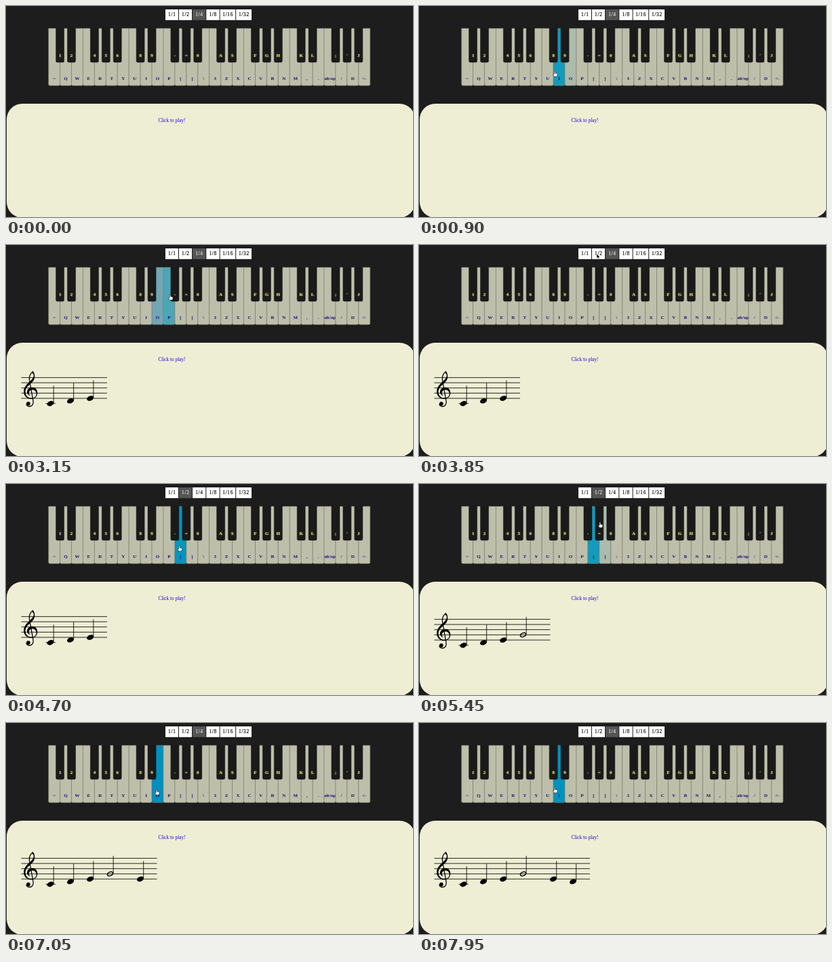
These frames come from a looping animation (600 by 311 pixels, 8000 ms). An HTML page:

```html
<!DOCTYPE html>
<html lang="en">
<head>
<meta charset="utf-8">
<title>Piano notes</title>
<style>
  html, body { margin: 0; width: 100%; height: 100%; overflow: hidden; background: #1d1d1d; }
  svg { display: block; width: 600px; height: 311px; }
  text { font-family: "Liberation Serif", serif; text-anchor: middle; white-space: pre; }
  .key { stroke: #7f8072; stroke-width: .6; }
  .label { font-weight: bold; font-size: 7px; fill: #1c1078; }
  .sharp { fill: #1a1a1a; stroke: #101010; stroke-width: .5; }
  .sharp-label { font-weight: bold; font-size: 7px; fill: #dede82; text-shadow: 0 0 2px #a0a020; }
  .length { font-size: 7.4px; letter-spacing: .7px; stroke-width: .15; }
  .play { font-size: 7.3px; fill: #1c00d2; }
  .line { stroke: #000; stroke-width: .85; fill: none; }
</style>
</head>
<body>
<svg viewBox="0 0 600 311" id="stage">
  <rect x="1" y="144" width="602" height="168" rx="23" fill="#eeeed5"/>
  <g id="buttons"></g>
  <g id="keys"></g>
  <text class="play" x="244.5" y="171">Click to play!</text>
  <g id="score">
    <path id="staff" class="line"/>
    <g transform="translate(0 -226)">
      <path d="M39 185.2C41.5 187.5 42.8 191 42.2 195.5C41.6 200 38.2 203 34.5 206C31 209 28.6 212 28.6 216.5C28.6 222 32.5 225.6 37.5 225.6C42 225.6 44.7 223 44.7 219.5C44.7 216 42.5 213.6 39.2 213.6C36 213.6 33.8 215.6 33.8 218C33.8 220 35 221.6 36.8 222.4C33.5 222 31 219.8 31 216.8C31 212.8 34.5 209.8 39 209.8C43.5 209.8 46.3 213.5 46.3 218C46.3 223.5 42.5 226.9 37 226.9C30.5 226.9 26.2 222.3 26.2 216C26.2 210 30 206 33.6 202.6C37 199.5 40.6 196.3 40.8 192.5C40.9 190.5 40 189.3 38.9 189.3Z"/>
      <path d="M38.9 187C35.5 190 33.8 194.5 34.6 199.5L40 229.5C41 234.5 38.5 238 34.5 238C31.5 238 30 236 30 234.2" fill="none" stroke="#000" stroke-width="1.3"/>
      <circle cx="32.9" cy="233.9" r="2.8"/>
    </g>
    <g id="notes"></g>
  </g>
  <g id="cursor" stroke-linejoin="round">
    <path id="hand" d="M-.8 .4Q0-.6 .8 .4V3L3.4 3.6Q4.3 4 4 5.6L3.2 8H-.6L-2.6 5.2Q-2.6 4-.8 5Z" fill="#fff" stroke="#222" stroke-width=".6"/>
    <path id="arrow" d="M0 0V6.8L1.6 5.4L2.7 8L3.9 7.5L2.8 5H4.9Z" fill="#000" stroke="#fff" stroke-width=".6"/>
  </g>
</svg>
<script>
const LOOP = 8000, FADE = 200, FADE_STEPS = 20;
const KEY_LEFT = 62.7, KEY_WIDTH = 16.93, KEY_TOP = 33, KEY_BOTTOM = 117;
const IDLE = [190, 191, 170], HOVER = [0, 150, 190], PRESSED = [0, 128, 192];
const GAP = 7.65;
const $ = id => document.getElementById(id);

function add(parent, tag, attrs, text = '') {
  const node = document.createElementNS('http://www.w3.org/2000/svg', tag);
  for (const name in attrs) node.setAttribute(name, attrs[name]);
  node.textContent = text;
  return parent.appendChild(node);
}

// Note length buttons
const buttons = [['1/1', 235, 19], ['1/2', 255, 19], ['1/4', 275, 19.3],
  ['1/8', 295.3, 19.3], ['1/16', 315.6, 22.6], ['1/32', 339.2, 22.8]].map(([name, x, w]) => ({
  box: add($('buttons'), 'rect', { x, y: 5, width: w, height: 15.8 }),
  text: add($('buttons'), 'text', { class: 'length', x: x + w / 2 + .3, y: 15.2 }, name)
}));

// Keyboard
const whiteNames = '~ Q W E R T Y U I O P [ ] \\ 3 Z X C V B N M , . alt/op / D <-'.split(' ');
const sharpNames = "1 2 4 5 6 8 9 - = 0 A S F G H K L ; ' J".split(' ');
const keys = whiteNames.map((name, i) => {
  const x = KEY_LEFT + i * KEY_WIDTH;
  const key = add($('keys'), 'path', { class: 'key',
    d: `M${x} ${KEY_TOP}h${KEY_WIDTH}v82.5q0 1.8-1.8 1.8h${3.6 - KEY_WIDTH}q-1.8 0-1.8-1.8z` });
  add($('keys'), 'text', { class: 'label', x: x + KEY_WIDTH / 2, y: 109 }, name);
  return key;
});
let slot = 0;
sharpNames.forEach(name => {
  while ([2, 6].includes(slot % 7)) slot++;
  const x = KEY_LEFT + ++slot * KEY_WIDTH;
  add($('keys'), 'path', { class: 'sharp', d: `M${x - 6} 32.5h12v48.5q0 2-2 2h-8q-2 0-2-2z` });
  add($('keys'), 'text', { class: 'sharp-label', x, y: 75 }, name);
});

// Notes: start time, head x, step above the bottom line, key index
const notes = [
  { at: 1350, x: 65.5, step: -2, key: 7, end: 91 },
  { at: 1950, x: 95, step: -1, key: 8, end: 120 },
  { at: 2750, x: 124.2, step: 0, key: 9, end: 149 },
  { at: 4900, x: 153.5, step: 2, key: 11, end: 193.5, half: true },
  { at: 7000, x: 198, step: 0, key: 9, end: 222.5 },
  { at: 7500, x: 227, step: -1, key: 8, end: 252 }
];
for (const n of notes) {
  const y = -n.step * GAP / 2;
  n.group = add($('notes'), 'g', {});
  const head = n.half ? { rx: 4.3, ry: 2.7, fill: 'none', stroke: '#000', 'stroke-width': 1.5 } : { rx: 5.2, ry: 3.5 };
  add(n.group, 'ellipse', { ...head, transform: `translate(${n.x} ${y}) rotate(-22)` });
  add(n.group, 'path', { class: 'line', d: `M${n.x + 4.7} ${y - 1}V${y - 26.5}` });
  if (n.step === -2) add(n.group, 'path', { class: 'line', d: `M${n.x - 7} ${y}h14.5` });
}

// Pointer stops: time, x, y
const stops = [
  [0, 340, -12], [250, 330, -12], [850, 200, 96], [1000, 200, 96], [1200, 188, 100],
  [1550, 188, 100], [1800, 202, 101], [2350, 202, 101], [2550, 219, 100], [2900, 220, 100],
  [3150, 242, 73], [3700, 262, 13], [4100, 262, 13], [4550, 255.5, 91], [5150, 255.5, 91],
  [5800, 281, 13], [6150, 281, 14], [6250, 281, 14], [6800, 222, 98], [7150, 222, 98],
  [7350, 200, 95], [LOOP, 200, 95]
];

function pointerAt(t) {
  t = Math.max(0, t);
  const i = stops.findIndex(s => s[0] > t);
  const [t0, x0, y0] = stops[i - 1], [t1, x1, y1] = stops[i];
  const p = (t - t0) / (t1 - t0), e = p * p * (3 - 2 * p);
  return [x0 + (x1 - x0) * e, y0 + (y1 - y0) * e];
}

function hoveredKey(t) {
  const [x, y] = pointerAt(t);
  return y > KEY_TOP && y < KEY_BOTTOM ? Math.floor((x - KEY_LEFT) / KEY_WIDTH) : -1;
}

// Averaging the recent states gives each key a linear colour transition.
function paintKeys(t) {
  const sums = keys.map(() => IDLE.map(c => c * FADE_STEPS));
  for (let s = 0; s < FADE_STEPS; s++) {
    const past = t - s * FADE / FADE_STEPS, k = hoveredKey(past);
    if (!sums[k]) continue;
    const down = notes.some(n => n.key === k && past >= n.at && past < n.at + 300);
    const color = down ? PRESSED : HOVER;
    sums[k] = sums[k].map((v, c) => v + color[c] - IDLE[c]);
  }
  keys.forEach((key, i) => key.setAttribute('fill', `rgb(${sums[i].map(v => Math.round(v / FADE_STEPS))})`));
}

function paintScore(t) {
  const shown = notes.filter(n => t >= n.at);
  $('score').style.display = shown.length ? '' : 'none';
  if (!shown.length) return;
  notes.forEach(n => n.group.style.display = t >= n.at ? '' : 'none');
  const end = shown[shown.length - 1].end;
  $('staff').setAttribute('d', [0, 1, 2, 3, 4].map(i => `M22.5 ${-i * GAP}H${end}`).join(''));
  $('score').setAttribute('transform', `translate(0 ${shown.length > 3 ? 230 : 226})`);
}

function paint(now) {
  const t = now % LOOP, [x, y] = pointerAt(t);
  const selected = t >= 3900 && t < 6050 ? 1 : 2;
  buttons.forEach(({ box, text }, i) => {
    box.setAttribute('fill', i === selected ? '#555' : '#fff');
    for (const a of ['fill', 'stroke']) text.setAttribute(a, i === selected ? '#e4e4e4' : '#000');
  });
  paintKeys(t);
  paintScore(t);
  $('cursor').setAttribute('transform', `translate(${x} ${y})`);
  $('hand').style.display = y > KEY_TOP ? '' : 'none';
  $('arrow').style.display = y > KEY_TOP ? 'none' : '';
  requestAnimationFrame(paint);
}
paint(0);
</script>
</body>
</html>
```
